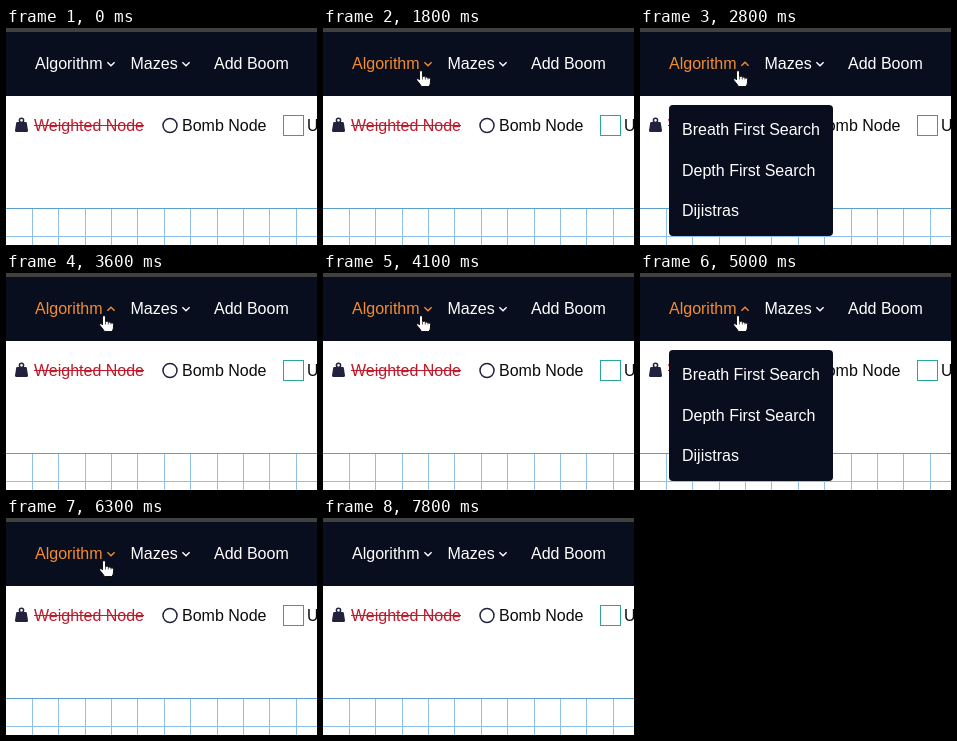
An HTML page with a canvas that plays this animation: 311 px wide and 217 px high, repeating every 8600 ms.

```html
<!DOCTYPE html>
<html lang="en">
<head>
<meta charset="utf-8">
<title>Algorithm menu</title>
<style>
  html, body { margin: 0; width: 100%; height: 100%; overflow: hidden; background: #fff; }
  canvas { display: block; width: 311px; height: 217px; }
</style>
</head>
<body>
<canvas id="stage" width="311" height="217"></canvas>
<script>
const W = 311, H = 217, LOOP = 8600, STEP = 100;
const NAVY = '#090e1e', ORANGE = '#f28c30', INK = '#22223f';
const ctx = document.getElementById('stage').getContext('2d');

const hand = new Path2D('M3.5 10V2a1.5 1.5 0 0 1 3 0V6.5q2.5-.8 3 .6q2-.6 2.6 .8q2.2-.4 2.4 1.4V12' +
  'q0 2.5-1.5 4.5H5.5Q4.5 14.5 1 10.5Q.3 9 1.6 8.5Q2.8 8.4 3.5 10Z');
const arrow = new Path2D('M.5 .5V13.5L3.6 10.8L5.7 15.5L8 14.5L6 10H10Z');
const bag = new Path2D('M11.2 94H19.8Q20.6 94 20.8 94.8L22 102.6Q22.2 104 20.8 104H10.2' +
  'Q8.8 104 9 102.6L10.2 94.8Q10.4 94 11.2 94Z');

// Menu is open between open and close; the chevron turns for turn / back ms.
const visits = [
  { open: 2200, turn: 300, close: 3600, back: 500 },
  { open: 4600, turn: 100, close: 5600, back: 400 }
];

// Pointer positions, each held until the next one.
const moves = [
  { at: 0 },
  { at: 1300, shape: arrow, x: 136, y: 22 },
  { at: 1400, shape: hand, x: 98, y: 39 },
  { at: 1800, shape: hand, x: 93, y: 42 },
  { at: 7700, shape: hand, x: 92, y: 45 },
  { at: 7800 }
];

const clamp = v => Math.max(0, Math.min(1, v));
const ease = v => v * v * (3 - 2 * v);

function rect(x, y, w, h, color) {
  ctx.fillStyle = color;
  ctx.fillRect(x, y, w, h);
}

function text(str, x, y, color) {
  ctx.fillStyle = color;
  ctx.fillText(str, x, y);
}

function chevron(x, y, turn, color) {
  ctx.save();
  ctx.translate(x, y);
  ctx.rotate(Math.PI * turn);
  ctx.strokeStyle = color;
  ctx.lineWidth = 1.4;
  ctx.beginPath();
  ctx.moveTo(-3.6, -1.8);
  ctx.lineTo(0, 1.8);
  ctx.lineTo(3.6, -1.8);
  ctx.stroke();
  ctx.restore();
}

function drawNav(hover, turn) {
  rect(0, 0, W, 4, '#40403f');
  rect(0, 4, W, 64, NAVY);
  const color = hover ? ORANGE : '#fff';
  text('Algorithm', 29, 41, color);
  chevron(105, 36, turn, color);
  text('Mazes', 124.5, 41, '#fff');
  chevron(180, 36, 0, '#fff');
  text('Add Boom', 208, 41, '#fff');
}

function drawLegend() {
  ctx.fillStyle = ctx.strokeStyle = INK;
  ctx.fill(bag);
  ctx.lineWidth = 1.5;
  ctx.beginPath();
  ctx.arc(15.5, 92.3, 2.1, 0, 7);
  ctx.stroke();

  text('Weighted Node', 28, 103, '#bd1a2b');
  rect(28, 97, 110, 1, '#bd1a2b');

  ctx.beginPath();
  ctx.arc(164, 97.5, 7, 0, 7);
  ctx.stroke();
  text('Bomb Node', 176, 103, '#0b0b0b');

  ctx.strokeStyle = '#2aa79b';
  ctx.lineWidth = 1;
  ctx.strokeRect(277.5, 87.5, 20, 20);
  text('Unvisited Node', 301, 103, '#0b0b0b');
}

function drawGrid() {
  for (let i = 1; i < 12; i++) rect(Math.floor(i * 26.38), 181, 1, H - 181, '#8fc0e6');
  rect(0, 208, W, 1, '#8fc0e6');
  rect(0, 180, W, 1, '#5f9fd0');
}

function drawMenu() {
  ctx.fillStyle = NAVY;
  ctx.beginPath();
  ctx.roundRect(29, 77, 164, 131, 4);
  ctx.fill();
  text('Breath First Search', 42, 107, '#fff');
  text('Depth First Search', 42, 148, '#fff');
  text('Dijistras', 42, 188, '#fff');
}

function drawPointer({ shape, x, y }) {
  if (!shape) return;
  ctx.save();
  ctx.translate(x, y);
  ctx.fillStyle = '#fff';
  ctx.strokeStyle = '#111';
  ctx.lineWidth = 1;
  ctx.lineJoin = 'round';
  ctx.fill(shape);
  ctx.stroke(shape);
  if (shape === hand) {
    ctx.lineWidth = 0.7;
    ctx.beginPath();
    for (const px of [6.5, 9.3, 11.9]) {
      ctx.moveTo(px, 7);
      ctx.lineTo(px, 9.5);
    }
    ctx.stroke();
  }
  ctx.restore();
}

function draw(t) {
  let turn = 0, open = false;
  for (const v of visits) {
    turn += ease(clamp((t - v.open) / v.turn)) - ease(clamp((t - v.close) / v.back));
    open = open || (t >= v.open && t < v.close);
  }
  ctx.font = '16px "Liberation Sans", Arial, sans-serif';
  rect(0, 0, W, H, '#fff');
  drawNav(t >= 1400 && t < 7800, turn);
  drawLegend();
  drawGrid();
  if (open) drawMenu();
  drawPointer(moves.filter(m => m.at <= t).pop());
}

const start = performance.now();
function tick() {
  const t = (performance.now() - start) % LOOP;
  draw(Math.floor(t / STEP) * STEP);
  requestAnimationFrame(tick);
}
tick();
</script>
</body>
</html>
```
